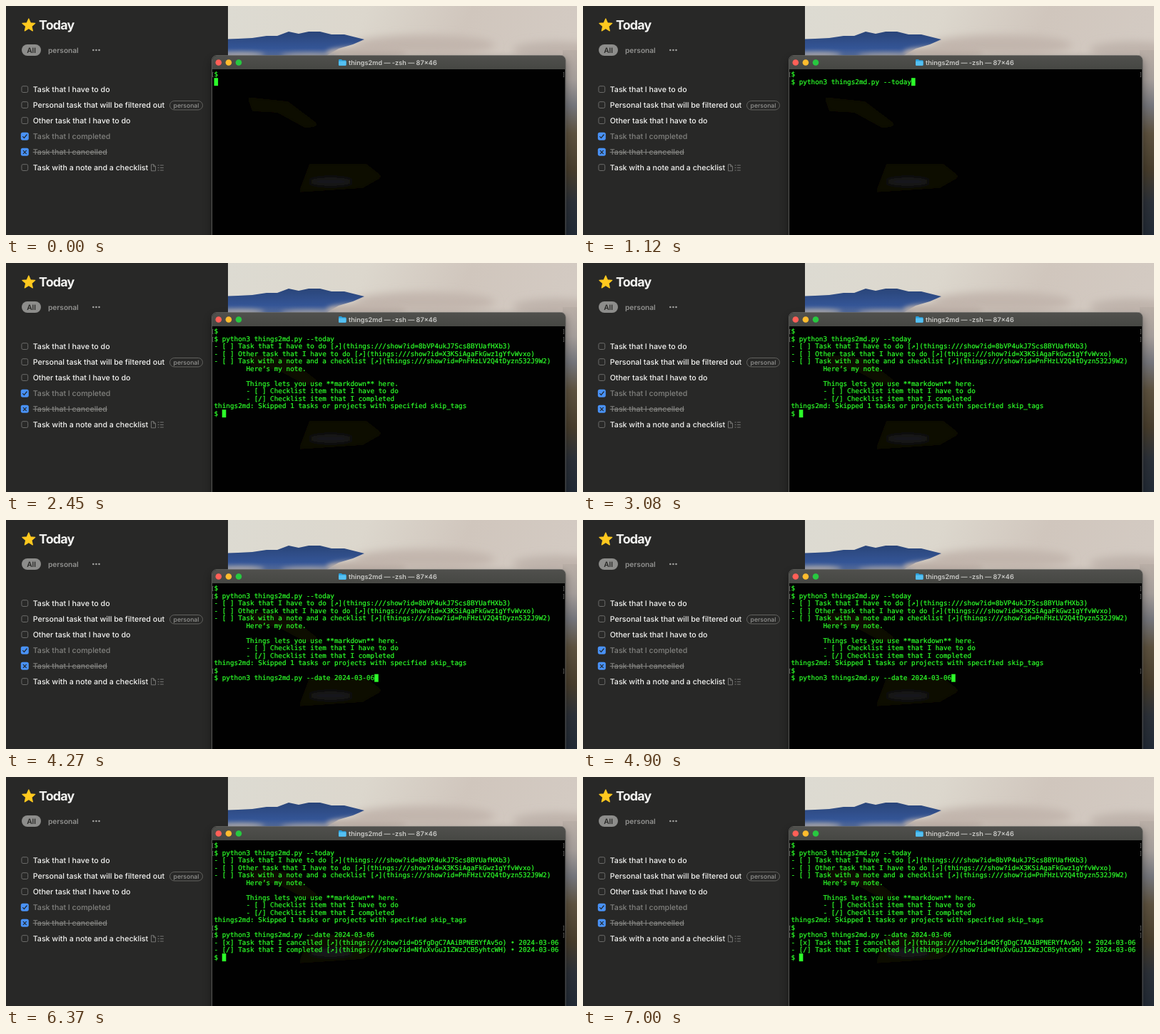
Recreate the animation shown at these times as an HTML page. Size 800 by 322 pixels, loop 7.28 s.

```html
<!DOCTYPE html>
<html lang="en">
<head>
<meta charset="utf-8">
<title>things2md demo</title>
<style>
html, body { margin: 0; width: 100%; height: 100%; overflow: hidden; background: #282827; }
svg { display: block; width: 800px; height: 322px; }
text { white-space: pre; text-rendering: geometricPrecision; }
.ui { font-family: Inter, "Open Sans", sans-serif; font-size: 10.63px; font-weight: 500; fill: #f4f4f2; }
.term { font-family: "DejaVu Sans Mono", monospace; font-size: 9.33px; fill: #2dfe2a; stroke: #2dfe2a; stroke-width: .22px; }
.mark { font-family: "DejaVu Sans Mono", monospace; font-size: 8px; fill: #6c6c6a; }
</style>
</head>
<body>
<svg viewBox="0 0 800 322" xmlns="http://www.w3.org/2000/svg">
  <defs>
    <linearGradient id="sky" x2="1" y2=".08">
      <stop offset="0" stop-color="#dddbd2"/>
      <stop offset=".4" stop-color="#dcd7cd"/>
      <stop offset=".7" stop-color="#d0c6bd"/>
      <stop offset="1" stop-color="#d3cac2"/>
    </linearGradient>
    <linearGradient id="ridge" x2="0" y2="1">
      <stop offset="0" stop-color="#2a4579"/>
      <stop offset=".6" stop-color="#345596"/>
      <stop offset="1" stop-color="#6a7ba3"/>
    </linearGradient>
    <linearGradient id="edge" x2="0" y2="1">
      <stop offset="0" stop-color="#b9aea6"/>
      <stop offset=".16" stop-color="#a49d99"/>
      <stop offset=".3" stop-color="#74757a"/>
      <stop offset=".45" stop-color="#5d523f"/>
      <stop offset=".65" stop-color="#473d2c"/>
      <stop offset=".82" stop-color="#2c3138"/>
      <stop offset="1" stop-color="#222a35"/>
    </linearGradient>
    <linearGradient id="bar" x2="0" y2="1">
      <stop offset="0" stop-color="#50504d"/>
      <stop offset="1" stop-color="#464743"/>
    </linearGradient>
    <filter id="soft" x="-30%" y="-60%" width="160%" height="220%"><feGaussianBlur stdDeviation="6"/></filter>
    <filter id="haze" x="-30%" y="-60%" width="160%" height="220%"><feGaussianBlur stdDeviation="3"/></filter>
    <clipPath id="view"><rect x="311" width="489" height="322"/></clipPath>
  </defs>

  <!-- wallpaper -->
  <g clip-path="url(#view)">
    <rect x="311" width="489" height="90" fill="url(#sky)"/>
    <g filter="url(#soft)">
      <ellipse cx="585" cy="55" rx="100" ry="14" fill="#c2b6ad"/>
      <ellipse cx="770" cy="62" rx="60" ry="12" fill="#bfb4ac"/>
    </g>
    <path d="M300 47 L325 46 345 45 365 42 380 42 396 36 410 39 424 36 440 36 456 40 474 40 490 44 502 47 486 54 466 60 440 75 H300Z" fill="url(#ridge)"/>
    <g filter="url(#haze)">
      <ellipse cx="328" cy="69" rx="34" ry="4" fill="#b3b0b0"/>
      <ellipse cx="505" cy="65" rx="56" ry="8" fill="#c0b3aa"/>
      <ellipse cx="425" cy="70" rx="40" ry="4" fill="#a5a4ac"/>
    </g>
    <rect x="780" y="62" width="20" height="260" fill="url(#edge)"/>
  </g>

  <!-- task list -->
  <rect width="311" height="322" fill="#282827"/>
  <path id="star" fill="#ffc91f" stroke="#ffc91f" stroke-width="1.2" stroke-linejoin="round"/>
  <text class="ui" x="46" y="33" style="font-size:17.8px;font-weight:700;letter-spacing:-.8px">Today</text>
  <rect x="22" y="54" width="27" height="16" rx="8" fill="#8d8d8b"/>
  <text class="ui" x="35.5" y="65.7" text-anchor="middle" style="font-size:10.2px;font-weight:600;fill:#2a2a28">All</text>
  <text class="ui" x="59" y="65.7" style="font-size:10.15px;font-weight:600;fill:#929290">personal</text>
  <g fill="#a2a2a0"><circle cx="122.3" cy="62" r="1.3"/><circle cx="126.4" cy="62" r="1.3"/><circle cx="130.5" cy="62" r="1.3"/></g>
  <g id="tasks"></g>
  <rect x="229.5" y="133.5" width="46" height="12.5" rx="6.25" fill="none" stroke="#62625f"/>
  <text class="ui" x="252.5" y="142.8" text-anchor="middle" style="font-size:8.65px;fill:#939391">personal</text>
  <g fill="none" stroke="#7d7d7b" stroke-width=".9">
    <path d="M203.5 222.8h3.4l2.6 2.8v6.2h-6zM206.7 222.8v2.9h2.7"/>
    <path d="M216 224h4.8M216 227.5h4.8M216 231h4.8M212.6 224h2M212.6 227.5h2M212.6 231h2"/>
  </g>

  <!-- terminal window -->
  <rect x="287" y="74" width="498" height="270" rx="8" fill="#000" opacity=".32" filter="url(#soft)"/>
  <path d="M289 322V76a6 6 0 0 1 6-6H777.5a6 6 0 0 1 6 6V322Z" fill="#010101"/>
  <g filter="url(#haze)" fill="#0d0a05">
    <path d="M338 128 L395 134 440 168 420 172 380 150 345 148Z"/>
    <path d="M425 222 L505 222 528 240 500 256 410 262Z"/>
    <ellipse cx="455" cy="247" rx="30" ry="6" fill="#15161a"/>
  </g>
  <path d="M289 89V76a6 6 0 0 1 6-6H777.5a6 6 0 0 1 6 6V89Z" fill="url(#bar)"/>
  <path d="M288.5 322V76a6.5 6.5 0 0 1 6.5-6.5H777.5a6.5 6.5 0 0 1 6.5 6.5V322" fill="none" stroke="#666663" stroke-width=".8"/>
  <circle cx="297.8" cy="79.5" r="4.3" fill="#ff5f57"/>
  <circle cx="311.9" cy="79.5" r="4.3" fill="#febc2e"/>
  <circle cx="326" cy="79.5" r="4.3" fill="#28c840"/>
  <path d="M466 76.2q0-1.2 1.2-1.2h2.8l1.2 1.2h4.2q1.2 0 1.2 1.2v5.2q0 1.2-1.2 1.2h-8.2q-1.2 0-1.2-1.2z" fill="#29a0dc"/>
  <rect x="466" y="77.4" width="10.6" height="6.4" rx="1.1" fill="#55c0f2"/>
  <text class="ui" x="480" y="82.7" style="font-size:9.15px;font-weight:600;fill:#cacac7">things2md — -zsh — 87×46</text>
  <g id="rows"></g>
  <rect id="cursor" width="5.6" height="11" fill="#2dfe2a"/>
</svg>
<script>
const NS = "http://www.w3.org/2000/svg";
const $ = id => document.getElementById(id);
const LOOP = 7280, LEFT = 291.5, TOP = 96, PITCH = 10.5, CHAR = 5.617;

function add(parent, tag, attrs, text) {
  const el = document.createElementNS(NS, tag);
  for (const k in attrs) el.setAttribute(k, attrs[k]);
  if (text) el.textContent = text;
  parent.appendChild(el);
  return el;
}

const starPath = Array.from({ length: 10 }, (_, i) => {
  const r = i % 2 ? 4.3 : 9.4, a = i * Math.PI / 5 - Math.PI / 2;
  return (31.8 + r * Math.cos(a)).toFixed(2) + " " + (27.3 + r * Math.sin(a)).toFixed(2);
});
$("star").setAttribute("d", "M" + starPath.join("L") + "Z");

const tasks = [
  ["Task that I have to do"],
  ["Personal task that will be filtered out"],
  ["Other task that I have to do"],
  ["Task that I completed", "M23.6 183.6l1.8 2 3.7-4.6"],
  ["Task that I cancelled", "M24.2 203.4l4.2 4.2m0-4.2l-4.2 4.2"],
  ["Task with a note and a checklist"]
];
tasks.forEach(([label, tick], i) => {
  const y = 117.3 + i * 22;
  const box = tick
    ? { x: 20.8, y: y - 5.6, width: 11, height: 11, rx: 2.6, fill: "#4992f7" }
    : { x: 21.9, y: y - 4.6, width: 8.8, height: 8.8, rx: 2, fill: "none", stroke: "#6c6c6a" };
  add($("tasks"), "rect", box);
  if (tick) add($("tasks"), "path", { d: tick, fill: "none", stroke: "#222629", "stroke-width": 1.2, "stroke-linecap": "round" });
  const style = (tick ? "fill:#82827f;" : "") + (i === 4 ? "text-decoration:line-through" : "");
  add($("tasks"), "text", { class: "ui", x: 37.7, y: y + 3.7, style }, label);
});

const link = id => `[↗](things:///show?id=${id})`;
const today = "$ python3 things2md.py --today";
const date = "$ python3 things2md.py --date 2024-03-06";
const list = [
  "- [ ] Task that I have to do " + link("8bVP4ukJ7Scs8BYUafHXb3"),
  "- [ ] Other task that I have to do " + link("X3KSiAgaFkGwz1gYfvWvxo"),
  "- [ ] Task with a note and a checklist " + link("PnFHzLV2Q4tDyzn532J9W2"),
  "        Here’s my note.",
  "",
  "        Things lets you use **markdown** here.",
  "        - [ ] Checklist item that I have to do",
  "        - [/] Checklist item that I completed",
  "things2md: Skipped 1 tasks or projects with specified skip_tags"
];
const done = [
  "- [x] Task that I cancelled " + link("D5fgDgC7AAiBPNERYfAv5o") + " • 2024-03-06",
  "- [/] Task that I completed " + link("NfuXvGuJ1ZWzJCB5yhtcWH") + " • 2024-03-06"
];

// [start time, first row, lines]; the cursor follows the last line
const events = [
  [0, 0, ["$ ", ""]],
  [70, 1, ["$ "]],
  [1120, 1, [today]],
  [1260, 2, [""]],
  [1610, 2, [...list, "$ "]],
  [3430, 12, [""]],
  [3640, 12, ["$ "]],
  [4270, 12, [date]],
  [5320, 13, [""]],
  [6230, 13, [...done, "$ "]]
];

const rows = Array.from({ length: 16 }, (_, i) => {
  const y = TOP + i * PITCH + 3.2;
  return {
    line: add($("rows"), "text", { class: "term", x: LEFT, y }),
    marks: [287.6, 779].map((x, k) => add($("rows"), "text", { class: "mark", x, y }, "[]"[k]))
  };
});

let shown = -1;
function draw(t) {
  const step = events.filter(e => e[0] <= t).length;
  if (step === shown) return;
  shown = step;
  const screen = [];
  for (const [, first, lines] of events.slice(0, step)) {
    lines.forEach((s, i) => screen[first + i] = s);
  }
  const last = screen.length - 1;
  rows.forEach((row, i) => {
    const s = screen[i] || "";
    row.line.textContent = s;
    const ran = s[0] === "$" && i < last;
    row.marks.forEach(m => m.setAttribute("visibility", ran ? "visible" : "hidden"));
  });
  $("cursor").setAttribute("x", LEFT + screen[last].length * CHAR);
  $("cursor").setAttribute("y", TOP + last * PITCH - 5.3);
}

const start = performance.now();
function tick() {
  draw((performance.now() - start) % LOOP);
  requestAnimationFrame(tick);
}
tick();
</script>
</body>
</html>
```
